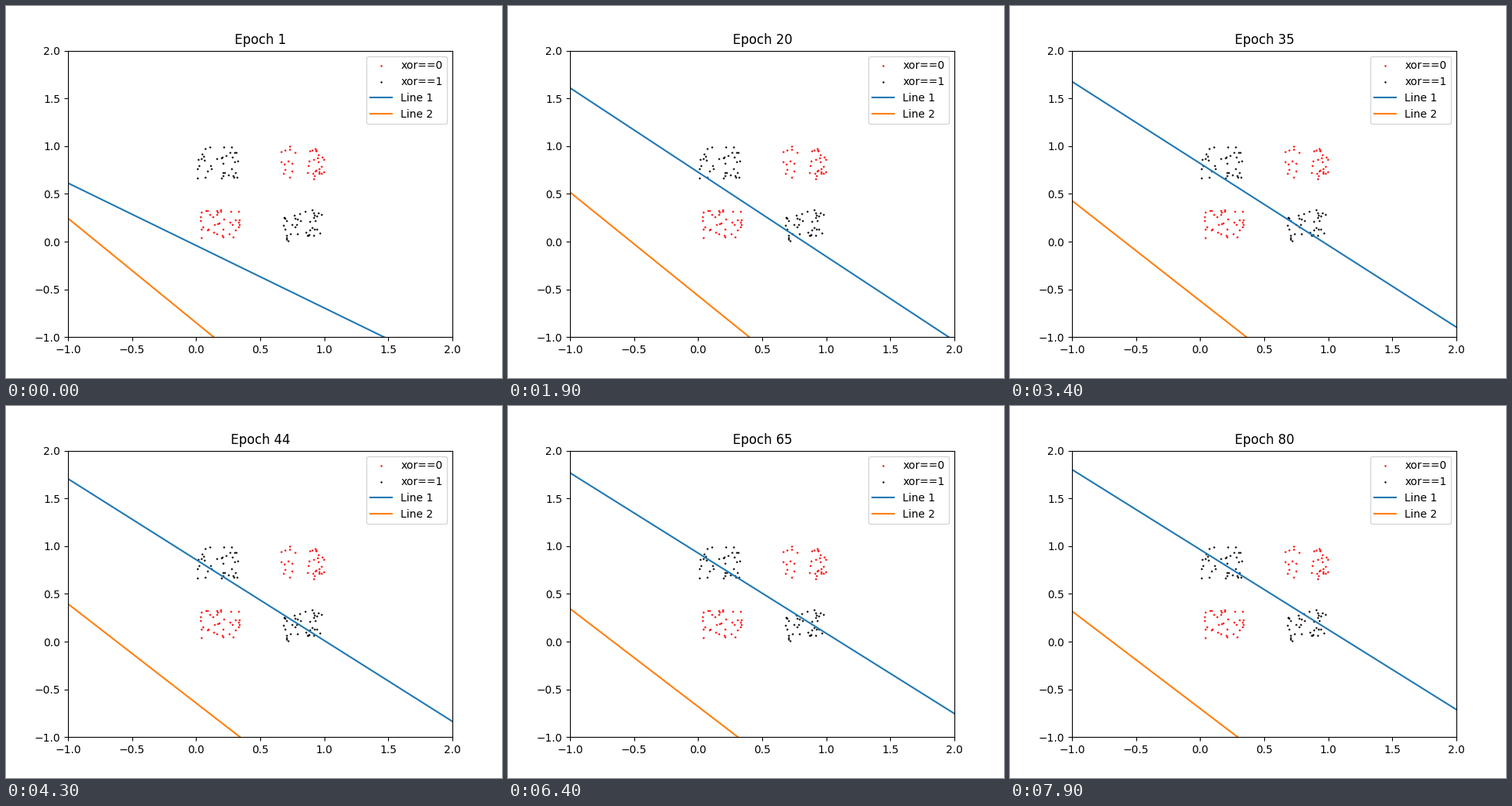
A matplotlib script for the animation above (8000 ms loop, 640 px wide and 480 px high).

```python
import numpy as np
import matplotlib.pyplot as plt
from matplotlib.animation import FuncAnimation

EPOCHS = 80
STEP_MS = 100

# Line states at a few epochs: height at x = -1, and slope
KEYS = np.log([1, 5, 11, 20, 44, 80])
LINE_1 = ([0.613, 1.28, 1.51, 1.61, 1.705, 1.802],
          [-0.654, -0.78, -0.868, -0.883, -0.847, -0.838])
LINE_2 = ([0.244, 0.585, 0.600, 0.517, 0.395, 0.319],
          [-1.094, -1.15, -1.138, -1.084, -1.039, -1.020])

rng = np.random.default_rng(7)


def scatter_box(count, x0, x1, y0, y1):
    """Uniform samples inside a box."""
    return rng.uniform((x0, y0), (x1, y1), (count, 2))


def hermite(values, s):
    """Smooth curve through the key values at log-epoch s."""
    v = np.array(values)
    m = np.gradient(v, KEYS)
    i = int(np.clip(np.searchsorted(KEYS, s) - 1, 0, len(v) - 2))
    h = KEYS[i + 1] - KEYS[i]
    t = (s - KEYS[i]) / h
    return ((1 + 2 * t) * (1 - t) ** 2 * v[i] + t * (1 - t) ** 2 * h * m[i]
            + t * t * (3 - 2 * t) * v[i + 1] + t * t * (t - 1) * h * m[i + 1])


# The top right cluster is split by a gap
same = np.vstack([scatter_box(13, 0.66, 0.77, 0.66, 1.00),
                  scatter_box(25, 0.87, 1.00, 0.66, 1.00),
                  scatter_box(38, 0.03, 0.345, 0.00, 0.35)])
differ = np.vstack([scatter_box(37, 0.00, 0.345, 0.655, 1.00),
                    scatter_box(40, 0.66, 1.00, 0.00, 0.335)])

fig, ax = plt.subplots(figsize=(6.4, 4.8), dpi=100)
ax.set(xlim=(-1, 2), ylim=(-1, 2))
for pts, color, label in ((same, "red", "xor==0"), (differ, "black", "xor==1")):
    ax.scatter(*pts.T, s=1, linewidths=0.7, color=color, label=label)

xs = np.array([-1.0, 2.0])
lines = [(ax.plot(xs, xs, label=name)[0], keys)
         for name, keys in (("Line 1", LINE_1), ("Line 2", LINE_2))]
title = ax.set_title("Epoch 1")
ax.legend(loc="upper right")


def update(frame):
    epoch = frame + 1
    s = np.log(epoch)
    for line, (heights, slopes) in lines:
        line.set_ydata(hermite(heights, s) + hermite(slopes, s) * (xs + 1))
    title.set_text(f"Epoch {epoch}")
    return [line for line, _ in lines] + [title]


anim = FuncAnimation(fig, update, frames=EPOCHS, interval=STEP_MS,
                     repeat=True, repeat_delay=0)
plt.show()
```
